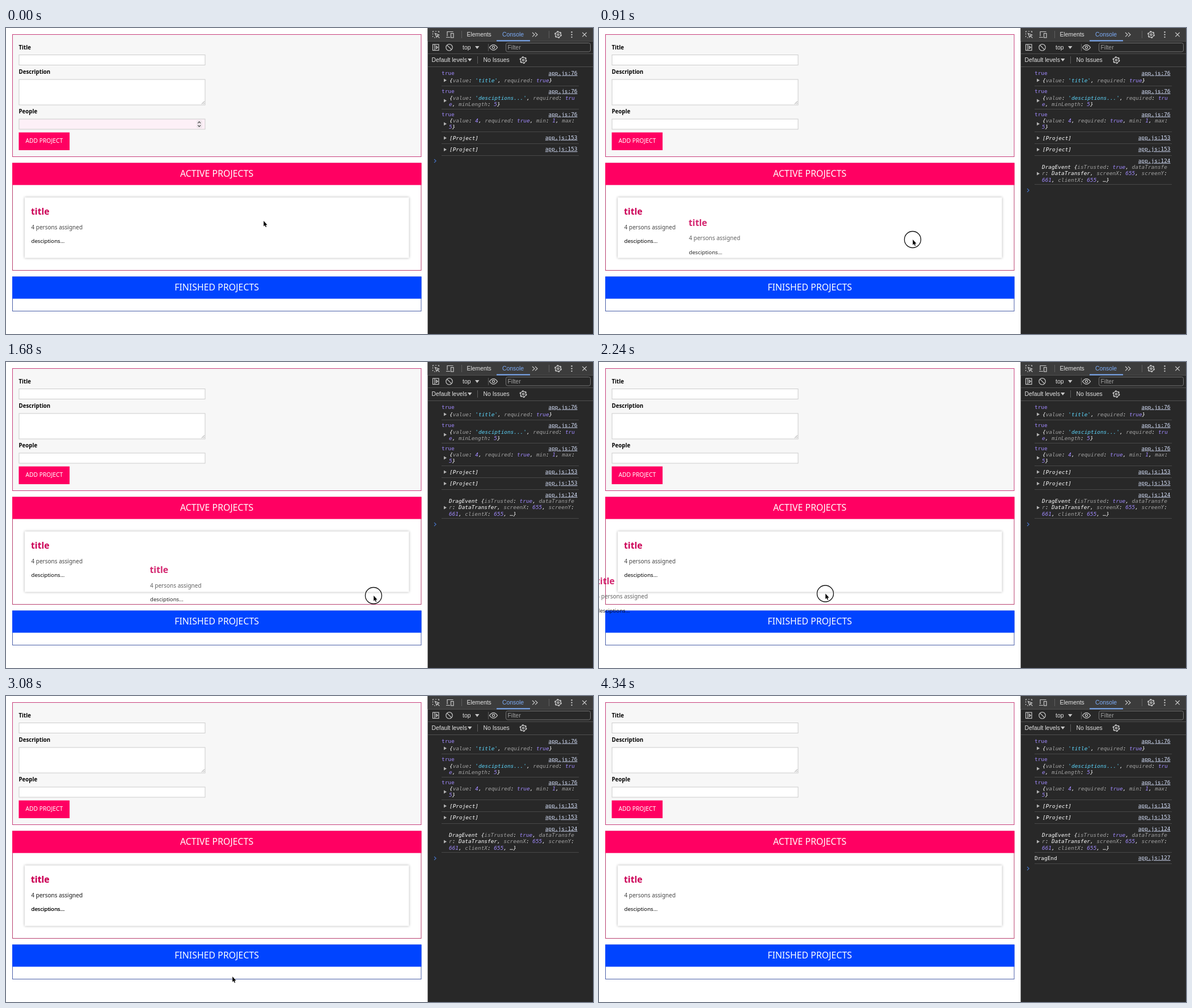
Animation of 1035x541 px, one loop 4550 ms. Source, as an HTML page:

```html
<!DOCTYPE html>
<html lang="en">
<head>
<meta charset="utf-8">
<title>Drag and drop board</title>
<style>
  html, body { margin: 0; width: 100%; height: 100%; overflow: hidden; background: #fff; }
  svg { display: block; width: 1035px; height: 541px; }
  text { white-space: pre; }
  .page { font-family: "Noto Sans", "Open Sans", sans-serif; font-size: 9.7px; }
  .label { font-weight: 600; }
  .head { font-size: 15.9px; font-weight: 500; fill: #fff; text-anchor: middle; }
  .card-title { font-size: 15.8px; font-weight: 600; fill: #cc0056; }
  .card-sub { font-size: 10px; font-weight: 500; fill: #464646; }
  .card-text { font-size: 9.6px; font-weight: 500; }
  .field { fill: #fff; stroke: #ccc; }
  .tools { font-family: "Liberation Sans", Arial, sans-serif; font-size: 10.4px; fill: #e3e3e3; }
  .log { font-family: "DejaVu Sans Mono", monospace; font-size: 9.42px; }
  .it { font-style: italic; }
  .link { text-decoration: underline; text-anchor: end; fill: #d6e0fa; }
  .icon { fill: none; stroke: #c7c7c7; stroke-width: 1.2; }
</style>
</head>
<body>
<svg viewBox="0 0 1035 541" xmlns="http://www.w3.org/2000/svg">
  <defs>
    <g id="gear" fill="none" stroke="#c7c7c7">
      <circle r="4.7" stroke-width="1.3"/>
      <circle r="5.6" stroke-width="1.8" stroke-dasharray="2.8 3.064"/>
      <circle r="1.6" stroke-width="1.3"/>
    </g>
    <g id="card">
      <text class="card-title" x="44" y="330">title</text>
      <text class="card-sub" x="44.5" y="355.7">4 persons assigned</text>
      <text class="card-text" x="44.5" y="380">desciptions...</text>
    </g>
  </defs>

  <g class="page">
    <rect width="744" height="541" fill="#fff"/>
    <rect x="11.5" y="11.5" width="720.5" height="216" fill="#f7f7f7" stroke="#c83c7a"/>
    <text class="label" x="22.5" y="37.5">Title</text>
    <rect class="field" x="23" y="47.5" width="328" height="18"/>
    <text class="label" x="22.5" y="80.700">Description</text>
    <rect class="field" x="23" y="91" width="328" height="45"/>
    <path d="M345 134.5l5-5M348 134.5l2-2" stroke="#777" stroke-width=".8"/>
    <text class="label" x="22.5" y="150.700">People</text>
    <rect id="people" class="field" x="23" y="161" width="328" height="18"/>
    <g id="spinner">
      <rect x="336" y="163" width="10" height="14" rx="2" fill="#efe6ec"/>
      <path d="M338.3 168.3l2.4-2.6 2.4 2.6M338.3 171.8l2.4 2.6 2.4-2.6" fill="none" stroke="#444" stroke-width="1.2"/>
    </g>
    <rect x="22.5" y="184.6" width="89.6" height="31.4" fill="#ff0062"/>
    <text x="67.3" y="203.2" font-size="10.3" fill="#fff" text-anchor="middle">ADD PROJECT</text>

    <rect x="11.5" y="239" width="720.5" height="189.5" fill="#fff" stroke="#b8406f"/>
    <rect x="11" y="238.5" width="721.5" height="39.1" fill="#ff0062"/>
    <text class="head" x="371.6" y="263.2">ACTIVE PROJECTS</text>
    <rect x="33" y="299.5" width="677.5" height="107" fill="#fff" style="filter:drop-shadow(.7px .7px 2.3px rgba(0,0,0,.32))"/>
    <use href="#card"/>

    <rect x="11.5" y="440" width="720.5" height="60.5" fill="#fff" stroke="#4a5fa8"/>
    <rect x="11" y="439.5" width="721.5" height="39.1" fill="#0044ff"/>
    <text class="head" x="371.6" y="464.2">FINISHED PROJECTS</text>
  </g>

  <g id="ghost" class="page" opacity=".85"><use href="#card"/></g>

  <g class="tools">
    <rect x="743.5" width="291.5" height="541" fill="#282828"/>
    <rect x="743.5" width="291.5" height="23" fill="#3c3c3c"/>
    <path d="M744 23.5h291M744 45.5h291M744 68.5h291" stroke="#505050"/>
    <path d="M803.5 5v13M957.5 5v13M850.5 28v13M831.5 50v13" stroke="#5e5e5e"/>
    <rect x="865" y="21.5" width="59" height="2" fill="#7cacf8"/>
    <text x="812.5" y="15.3">Elements</text>
    <text x="875" y="15.3" fill="#7cacf8">Console</text>
    <text x="805" y="38">top</text>
    <text x="750.5" y="60.3">Default levels</text>
    <text x="841.5" y="60.3">No Issues</text>
    <rect x="881.5" y="26.5" width="149" height="15.5" rx="3" fill="none" stroke="#757575"/>
    <text x="884.5" y="38" fill="#a0a0a0">Filter</text>
    <path d="M827 32h7.5l-3.75 5zM814 54h7.5l-3.75 5z" fill="#c7c7c7"/>
    <g class="icon">
      <path d="M757 17h-2M752.5 16v-2M752.5 11.5v-2M752.5 7.5v-1.5h2M757 6h2M761.5 6h1.8v2"/>
      <path d="M756.5 9.5l7 2.7-3 1.2-1.2 3zM760.5 13.5l3.8 4"/>
      <path d="M778 14.5v-8h10.5M776 16.5h7"/>
      <rect x="784.5" y="9.5" width="4.5" height="7.5"/>
      <path d="M928 8l4 3.7-4 3.7M933 8l4 3.7-4 3.7"/>
      <path d="M1016.3 8l7.4 7.4M1023.7 8l-7.4 7.4"/>
      <rect x="752.5" y="29" width="10.5" height="10.5"/>
      <path d="M756 29v10.5M758.5 32l3 2.3-3 2.3z"/>
      <circle cx="781.5" cy="34.3" r="5.7"/>
      <path d="M777.6 30.4l7.8 7.8"/>
      <path d="M852.5 34.3q7-9.5 14 0q-7 9.5-14 0z"/>
      <circle cx="859.5" cy="34.3" r="2.1"/>
    </g>
    <g fill="#c7c7c7">
      <circle cx="997.5" cy="7.3" r="1.2"/><circle cx="997.5" cy="11.7" r="1.2"/><circle cx="997.5" cy="16.1" r="1.2"/>
    </g>
    <use href="#gear" x="973.5" y="11.7"/>
    <use href="#gear" x="912" y="56.7"/>
  </g>

  <g id="log" class="log"></g>
  <g id="dragLog" class="log"></g>
  <g id="endLog" class="log"></g>
  <path id="prompt" d="M755 -3l3.2 3-3.2 3" fill="none" stroke="#4674c8" stroke-width="1.1"/>

  <g id="cursor">
    <circle id="ring" r="14.5" fill="none" stroke="#111" stroke-width="1.3"/>
    <path d="M.3 0V9.6L2.4 7.7 3.9 11 5.3 10.4 3.9 7.2H6.7Z" fill="#000" stroke="#fff" stroke-width=".8" paint-order="stroke"/>
  </g>
</svg>
<script>
const $ = id => document.getElementById(id);
const LOOP = 4550, STEP = 70, LAST = 4340;
const PRESS = 140, DRAG = 210, DROP = 2660, HOME = 3080, LOGGED = 3360;
const GRAB = [449, 347], LAG = 70;

// Console text: k = key, n = number or boolean, s = string, w = plain
const INK = { k: '#a2a2a2', n: '#a18aff', s: '#5cd5fb', w: '#fff' };

function line(x, y, parts, cls = 'it') {
  const spans = parts.map(([ink, s]) => `<tspan fill="${INK[ink]}">${s}</tspan>`).join('');
  return `<text class="${cls}" x="${x}" y="${y - .4}">${spans}</text>`;
}
const link = (y, row) => `<text class="link" x="1007.5" y="${y - .8}">app.js:${row}</text>`;
const rule = y => `<path d="M768 ${y}h242" stroke="#484848"/>`;
const arrow = y => `<path d="M772 ${y - 3}v6l5-3z" fill="#b4b4b4"/>`;
const passed = y => line(768, y, [['n', 'true']], '') + link(y, 76);
const project = y => arrow(y - 3.5) + line(782, y, [['w', '[Project]']]) + link(y - .5, 153);

$('log').innerHTML =
  passed(83.5) + arrow(92.5) +
  line(782, 96, [['w', '{'], ['k', 'value'], ['w', ': '], ['s', "'title'"], ['w', ', '], ['k', 'required'], ['w', ': '], ['n', 'true'], ['w', '}']]) +
  rule(102.5) + passed(115.5) + arrow(128.5) +
  line(782, 127, [['w', '{'], ['k', 'value'], ['w', ': '], ['s', "'desciptions...'"], ['w', ', '], ['k', 'required'], ['w', ': '], ['n', 'tru']]) +
  line(781, 138, [['n', 'e'], ['w', ', '], ['k', 'minLength'], ['w', ': '], ['n', '5'], ['w', '}']]) +
  rule(143.5) + passed(156.5) + arrow(169.5) +
  line(782, 167.5, [['w', '{'], ['k', 'value'], ['w', ': '], ['n', '4'], ['w', ', '], ['k', 'required'], ['w', ': '], ['n', 'true'], ['w', ', '], ['k', 'min'], ['w', ': '], ['n', '1'], ['w', ', '], ['k', 'max'], ['w', ':']]) +
  line(781, 178.5, [['n', '5'], ['w', '}']]) +
  rule(183.5) + project(198) + rule(204.5) + project(218.5) + rule(225.5);

$('dragLog').innerHTML =
  link(238.5, 124) + arrow(257.5) +
  line(781, 249.5, [['w', 'DragEvent {'], ['k', 'isTrusted'], ['w', ': '], ['n', 'true'], ['w', ', '], ['k', 'dataTransfe']]) +
  line(781, 260.5, [['k', 'r'], ['w', ': DataTransfer, '], ['k', 'screenX'], ['w', ': '], ['n', '655'], ['w', ', '], ['k', 'screenY'], ['w', ':']]) +
  line(781, 272, [['n', '661'], ['w', ', '], ['k', 'clientX'], ['w', ': '], ['n', '655'], ['w', ', …}']]) +
  rule(276.5);

$('endLog').innerHTML = line(768, 290, [['w', 'DragEnd']], '') + link(290, 127) + rule(296.5);

// Pointer path: [ms, x, y]
const KEYS = [
  [0, 454, 341], [140, 453, 343], [350, 510, 278], [560, 558, 232], [630, 559.5, 229],
  [840, 563, 366.5], [910, 553, 374], [1050, 400, 396], [1190, 390, 388], [1400, 530, 350],
  [1610, 658.5, 390], [1680, 648, 413], [1850, 560, 515], [2030, 425, 465], [2170, 400, 409.5],
  [2240, 399, 409.5], [2310, 399, 411], [2450, 398, 455], [2590, 399, 496], [3710, 399, 496],
  [3850, 411, 468], [3990, 440, 459.5], [4130, 464, 485], [4270, 480, 539.5]
];

const slope = (i, k) => (KEYS[i + 1][k] - KEYS[i][k]) / (KEYS[i + 1][0] - KEYS[i][0]);

// Monotone tangent: no overshoot at turns and rests
function tangent(i, k) {
  if (i === 0 || i === KEYS.length - 1) return 0;
  const a = slope(i - 1, k), b = slope(i, k);
  return a * b > 0 ? 2 * a * b / (a + b) : 0;
}

function pointer(t) {
  const end = KEYS.length - 1;
  t = Math.max(0, Math.min(t, KEYS[end][0]));
  let i = 0;
  while (i < end - 1 && t > KEYS[i + 1][0]) i++;
  const span = KEYS[i + 1][0] - KEYS[i][0], u = (t - KEYS[i][0]) / span;
  const h = u * u * (3 - 2 * u);
  return [1, 2].map(k =>
    KEYS[i][k] * (1 - h) + KEYS[i + 1][k] * h +
    span * (u * (1 - u) ** 2 * tangent(i, k) - u * u * (1 - u) * tangent(i + 1, k)));
}

const show = (id, on) => $(id).setAttribute('visibility', on ? 'visible' : 'hidden');
const move = (id, x, y) => $(id).setAttribute('transform', `translate(${x.toFixed(2)} ${y.toFixed(2)})`);

function draw(ms) {
  const t = Math.min(Math.floor((ms % LOOP) / STEP) * STEP, LAST);
  const held = t >= PRESS && t < DROP;

  $('people').style.fill = t < PRESS ? '#fdf0f7' : '#fff';
  show('spinner', t < PRESS);

  const [x, y] = pointer(t);
  move('cursor', x, y);
  show('cursor', t < LAST);
  show('ring', held);

  // The dragged copy trails the pointer, then flies back
  const [gx, gy] = pointer(Math.min(t, DROP) - LAG);
  const left = 1 - Math.max(0, Math.min(1, (t - DROP) / (HOME - DROP)));
  move('ghost', (gx - GRAB[0]) * left ** 2, (gy - GRAB[1]) * left ** 2);
  show('ghost', t >= DRAG && t <= HOME);

  show('dragLog', t >= DRAG);
  show('endLog', t >= LOGGED);
  move('prompt', 0, t < DRAG ? 235 : t < LOGGED ? 287 : 305);
}

const start = performance.now();
function tick() {
  draw(performance.now() - start);
  requestAnimationFrame(tick);
}
draw(0);
requestAnimationFrame(tick);
</script>
</body>
</html>
```
